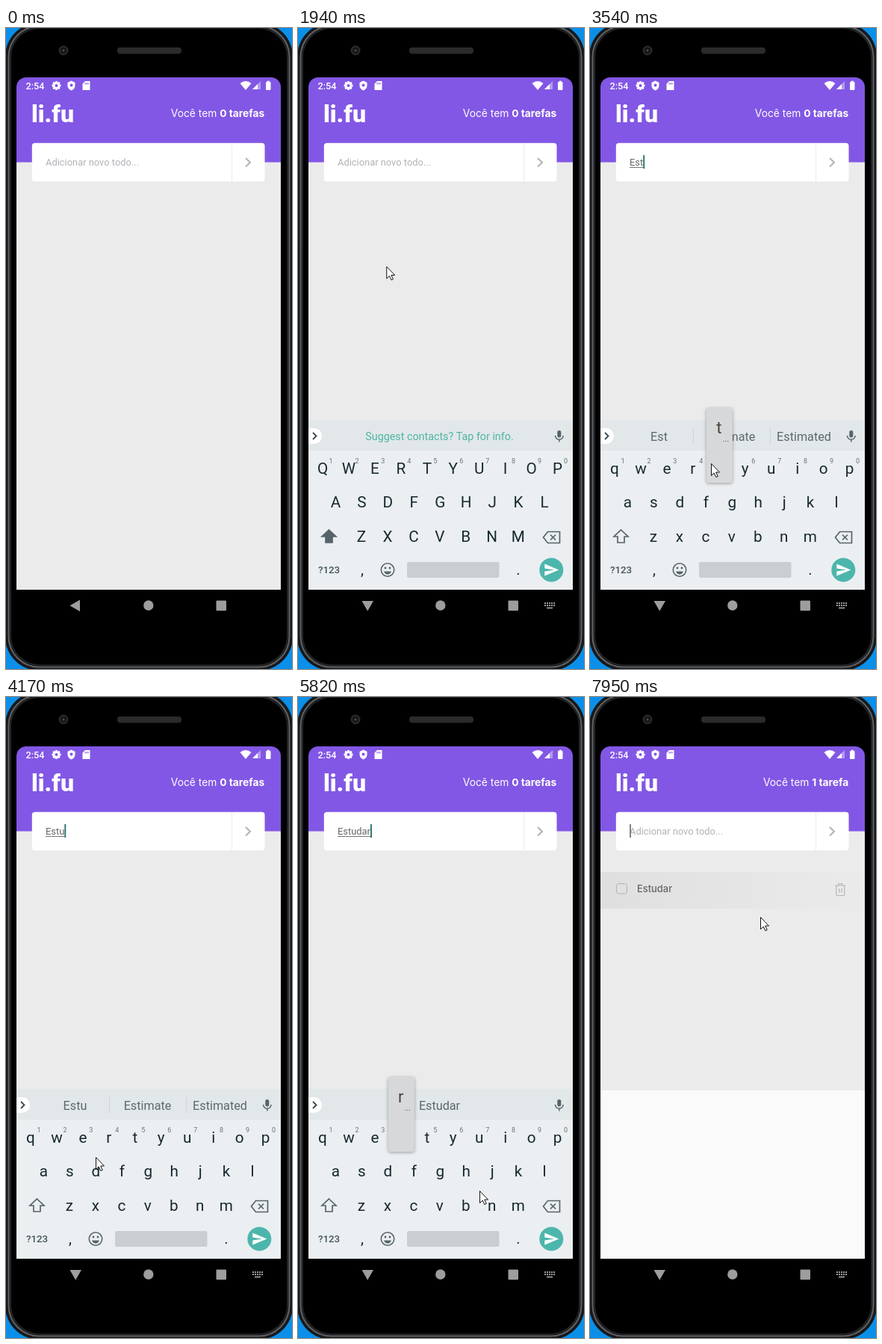
Recreate the animation shown at these times as an HTML page with a canvas. Size 383x857 px, loop 8000 ms.

```html
<!DOCTYPE html>
<html lang="pt-BR">
<head>
<meta charset="utf-8">
<title>Lista de tarefas</title>
<style>
html, body { margin: 0; width: 100%; height: 100%; overflow: hidden; background: #0b8fe9; }
canvas { display: block; width: 383px; height: 857px; }
</style>
</head>
<body>
<canvas id="stage" width="383" height="857"></canvas>
<script>
const canvas = document.getElementById('stage');
const stage = canvas.getContext('2d');
const layer = canvas.cloneNode().getContext('2d');
let ctx = stage;
const LOOP = 8000;
const ROBOTO = 'Roboto, sans-serif', INTER = 'Inter, sans-serif';

// pointer stops: time, x, y
const PATH = [
  [70, 367, 803], [850, 132, 183], [1000, 128, 176], [1730, 128, 176],
  [2260, 100, 584], [2450, 100, 584], [2640, 95, 622], [2850, 95, 622],
  [3330, 162, 582], [3650, 162, 582], [3800, 232, 584], [3930, 232, 584],
  [4170, 120, 615], [4450, 120, 615], [4800, 48, 622], [5080, 48, 622],
  [5500, 130, 582], [5720, 130, 582], [5820, 243, 660], [5890, 243, 660],
  [6080, 336, 722], [6300, 336, 722], [6580, 294, 535], [6650, 285, 418],
  [6720, 300, 350], [6790, 319, 310], [6990, 319, 310], [7480, 139, 170],
  [7740, 139, 170], [7950, 228, 294], [8000, 228, 294]
];

// key presses: letter, popup start, popup end
const PRESSES = [
  ['E', 2340, 2500], ['s', 2690, 2850], ['t', 3480, 3650], ['u', 3840, 4000],
  ['d', 4300, 4470], ['a', 4860, 5100], ['r', 5730, 5890]
];
const ROWS = [['qwertyuiop', 33, 588], ['asdfghjkl', 50.4, 633], ['zxcvbnm', 85, 679]];
const PITCH = 34.95;
const SENT = 6300, FOCUS = 1200, REFOCUS = 7810;
const CORNER = 13;

const clamp = v => Math.max(0, Math.min(1, v));
const ramp = (t, a, b) => clamp((t - a) / (b - a));
const smooth = v => v * v * (3 - 2 * v);

function text(s, x, y, size, color, font = ROBOTO, weight = 400, align = 'left') {
  ctx.font = `${weight} ${size}px ${font}`;
  ctx.textAlign = align;
  ctx.fillStyle = color;
  ctx.fillText(s, x, y);
  return ctx.measureText(s).width;
}

function rect(x, y, w, h, color, r = 0) {
  ctx.fillStyle = color;
  ctx.beginPath();
  ctx.roundRect(x, y, w, h, r);
  ctx.fill();
}

function frame(x, y, w, h, color, line, r = 0) {
  ctx.strokeStyle = color;
  ctx.lineWidth = line;
  ctx.beginPath();
  ctx.roundRect(x, y, w, h, r);
  ctx.stroke();
}

function disc(x, y, r, color) {
  ctx.fillStyle = color;
  ctx.beginPath();
  ctx.arc(x, y, r, 0, 7);
  ctx.fill();
}

function fillPath(d, color, x = 0, y = 0) {
  ctx.save();
  ctx.translate(x, y);
  ctx.fillStyle = color;
  ctx.fill(new Path2D(d), 'evenodd');
  ctx.restore();
}

function strokePath(d, color, line, x = 0, y = 0) {
  ctx.save();
  ctx.translate(x, y);
  ctx.strokeStyle = color;
  ctx.lineWidth = line;
  ctx.stroke(new Path2D(d));
  ctx.restore();
}

function phone() {
  rect(0, 0, 383, 857, '#0b8fe9');
  rect(-1, -7, 385, 866, '#17181a', 45);
  frame(3.5, -2.5, 376, 857, '#5f6266', 2, 41);
  frame(6, 0, 371, 852, '#222325', 2, 39);
  rect(7, 1, 369, 850, '#000', 38);
  disc(77, 30, 6.5, '#29292b');
  disc(77, 30, 4, '#151517');
  disc(77, 30, 1.6, '#4a4a4c');
  rect(149, 26, 86, 8.5, '#2b2b2b', 4);
}

function statusBar() {
  text('2:54', 26.5, 81.5, 12.7, '#fff', ROBOTO, 500);
  for (let i = 0; i < 4; i++) {
    ctx.save();
    ctx.translate(67.5, 77);
    ctx.rotate(i * Math.PI / 4);
    rect(-1.5, -6, 3, 12, '#fff', 0.5);
    ctx.restore();
  }
  disc(67.5, 77, 4.5, '#fff');
  disc(67.5, 77, 2, '#8257e5');
  fillPath('M0-6.5L5-4V0C5 3 3 5.5 0 6.5C-3 5.5-5 3-5 0V-4Z', '#fff', 87.5, 77);
  disc(87.5, 76.5, 2, '#8257e5');
  fillPath('M3.5-6H5V6H-5V-2.5L-1.5-6Z M-2-4V-1.5H-1V-4Z M0-4V-1.5H1V-4Z M2-4V-1.5H3V-4Z', '#fff', 107.5, 77);
  fillPath('M-7.5-3Q0-9 7.5-3L0 6Z', '#fff', 321, 77);
  fillPath('M341 71V82H330Z', 'rgba(255,255,255,.4)');
  fillPath('M337 75V82H330Z', '#fff');
  rect(348, 72, 6.5, 11, '#fff', 1);
  rect(349.8, 70.7, 3, 2, '#fff');
}

function header(t) {
  rect(14, 66, 354, 113.5, '#8257e5', [CORNER, CORNER, 0, 0]);
  statusBar();
  text('li.fu', 34, 125.5, 32, '#fff', ROBOTO, 900);
  const count = t < SENT ? '0 tarefas' : '1 tarefa';
  const w = text(count, 346.3, 119, 13.8, '#fff', INTER, 700, 'right');
  text('Você tem ', 346.3 - w, 119, 13.8, '#fff', INTER, 400, 'right');
}

function typedAt(t) {
  if (t >= SENT) return '';
  return PRESSES.filter(p => t >= p[1] + 50).map(p => p[0]).join('');
}

function caretOn(t) {
  if (t >= REFOCUS) return true;
  if (t < FOCUS || t >= SENT) return false;
  const since = PRESSES.reduce((last, p) => t >= p[1] + 50 ? p[1] + 50 : last, FOCUS);
  return (t - since) % 1000 < 500;
}

function input(t) {
  rect(34.8, 153.8, 311.7, 51.4, '#fff', 4);
  rect(302, 154, 1, 51, '#ebebeb');
  strokePath('M321 174L327 179.7L321 185.5', '#b2b2b2', 2);
  const typed = typedAt(t);
  let w = 0;
  if (typed) {
    w = text(typed, 53, 184.3, 12.9, '#666');
    rect(53, 186, w, 1, '#777');
  } else {
    text('Adicionar novo todo...', 53, 184.3, 12.9, '#b2b2b8');
  }
  if (caretOn(t)) rect(53 + w, 170, 2, 18, t >= REFOCUS ? '#7d8584' : typed ? '#317a70' : '#009688');
}

function task(t) {
  if (t < SENT) return;
  ctx.globalAlpha = ramp(t, SENT, SENT + 140);
  const g = ctx.createLinearGradient(14, 0, 368, 0);
  g.addColorStop(0, '#dfdfdf');
  g.addColorStop(1, '#ebebeb');
  rect(14, 234, 354, 49, g);
  frame(35.5, 249.5, 14, 13.5, '#b2b2b2', 1, 3);
  text('Estudar', 63, 261.3, 12.9, '#666', INTER, 500);
  ctx.globalAlpha = t < 6650 ? 0.25 : 1;
  strokePath('M-7-5.5H7M-2.5-5.5V-8H2.5V-5.5M-5.5-5.5V6.5Q-5.5 8 -4 8H4Q5.5 8 5.5 6.5V-5.5M-1.7-1.5V4M1.7-1.5V4',
    '#b2b2b2', 1.1, 335.3, 257.5);
  ctx.globalAlpha = 1;
}

function suggestions(typed) {
  const put = (s, x) => text(s, x, 552, 16.2, '#5c686d', ROBOTO, 400, 'center');
  if (typed.length < 3) {
    text('Suggest contacts? Tap for info.', 189.5, 551, 14.3, '#4db6a5', ROBOTO, 400, 'center');
  } else if (typed.length < 5) {
    [typed, 'Estimate', 'Estimated'].forEach((s, i) => put(s, [92.5, 189.5, 286.5][i]));
    rect(138, 535, 1, 21, '#cfd5d8');
    rect(241, 535, 1, 21, '#cfd5d8');
  } else {
    put(typed, 189.5);
  }
}

function keyPopup(press) {
  const letter = press[0];
  const row = ROWS.find(r => r[0].includes(letter.toLowerCase()));
  const x = row[1] + row[0].indexOf(letter.toLowerCase()) * PITCH, top = row[2] - 80;
  ctx.save();
  ctx.shadowColor = 'rgba(0,0,0,.35)';
  ctx.shadowBlur = 4;
  ctx.shadowOffsetY = 1;
  rect(x - 17, top, 35, 100, '#d6d8d9', 3);
  ctx.restore();
  text(letter, x, top + 34, 22, '#44443c', ROBOTO, 400, 'center');
  text('...', x + 9, top + 45, 11, '#555', ROBOTO, 400, 'center');
}

function keys(t) {
  const typed = t < SENT ? typedAt(t) : 'Estudar';
  const upper = !typed;
  const ink = '#17292f', grey = '#566469';
  rect(14, 524, 354, 41, '#e2e7e9');
  rect(14, 565, 354, 186, '#ebeff2');
  rect(14, 535, 18, 21, '#fff', [0, 10.5, 10.5, 0]);
  strokePath('M20 541L24.5 545.5L20 550', '#37474f', 1.8);
  rect(347.3, 538, 5, 9.5, grey, 2.5);
  strokePath('M344.5 545A5.3 5.3 0 0 0 355.1 545M349.8 550V553.5', grey, 1.5);
  suggestions(typed);

  ROWS.forEach(([letters, x0, y]) => [...letters].forEach((c, i) =>
    text(upper ? c.toUpperCase() : c, x0 + i * PITCH, y + 8, 20.7, ink, ROBOTO, 400, 'center')));
  for (let i = 0; i < 10; i++) {
    text((i + 1) % 10, 44 + i * PITCH, 581.5, 9, '#667378', ROBOTO, 400, 'center');
  }

  const shift = 'M0-9L9.5 0H4.5V8H-4.5V0H-9.5Z';
  if (upper) fillPath(shift, grey, 41.5, 680);
  strokePath(shift, grey, 1.7, 41.5, 680);
  strokePath('M-11 0L-5-7.5H11V7.5H-5ZM-1.5-3.5L5.5 3.5M5.5-3.5L-1.5 3.5', grey, 1.7, 339.5, 681);
  text('?123', 27, 729, 13.3, '#45545a', ROBOTO, 500);
  text(',', 86, 731, 20, ink, ROBOTO, 400, 'center');
  text('.', 295, 731, 20, ink, ROBOTO, 400, 'center');
  strokePath('M8.7 0A8.7 8.7 0 1 1-8.7 0A8.7 8.7 0 1 1 8.7 0', grey, 1.6, 120, 724.5);
  disc(117, 722, 1.4, grey);
  disc(123, 722, 1.4, grey);
  fillPath('M-5 2H5Q3.5 6 0 6T-5 2Z', grey, 120, 724.5);
  rect(146, 714, 123.5, 21, '#c9ced2', 2);
  disc(339.3, 724.5, 16, '#4db6ac');
  fillPath('M-9-8L10 0L-9 8V2L4 0L-9-2Z', '#fff', 339.3, 724.5);

  const press = PRESSES.find(p => t >= p[1] && t < p[2]);
  if (press) keyPopup(press);
}

// painted on its own layer, so that it fades as a whole
function keyboard(t) {
  const show = smooth(ramp(t, 1400, 1640));
  const hide = ramp(t, 6400, 6540);
  if (!show || t >= 6650) return;
  layer.clearRect(0, 0, 383, 857);
  ctx = layer;
  keys(t);
  ctx = stage;
  ctx.save();
  ctx.beginPath();
  ctx.roundRect(14, 66, 354, 726, CORNER);
  ctx.clip();
  ctx.globalAlpha = show * (1 - 0.69 * hide);
  ctx.drawImage(layer.canvas, 0, 41 * (1 - show + hide));
  ctx.restore();
}

function navBar(t) {
  const typing = (t >= 1250 && t < 6440) || t >= 7880;
  const c = '#9d9d9d';
  if (typing) fillPath('M85.5 766H101L93.2 779.5Z', c);
  else fillPath('M99 764.5V780L85.5 772.2Z', c);
  disc(190.8, 772, 6.7, c);
  rect(281.5, 765.5, 13.5, 13.5, c, 1);
  if (!typing) return;
  for (let r = 0; r < 2; r++)
    for (let i = 0; i < 5; i++) rect(330 + i * 3, 768 + r * 3, 2, 2, c);
  rect(333, 774.5, 8, 1.8, c);
}

function pointer(t) {
  if (t < PATH[0][0]) return;
  let i = 0;
  while (i < PATH.length - 2 && t >= PATH[i + 1][0]) i++;
  const [t0, x0, y0] = PATH[i], [t1, x1, y1] = PATH[i + 1];
  const k = smooth(ramp(t, t0, t1));
  const x = x0 + (x1 - x0) * k, y = y0 + (y1 - y0) * k;
  const arrow = 'M.5.5V16.5L4.2 13L6.8 18.5L9.2 17.4L6.7 12H11.5Z';
  fillPath(arrow, '#fff', x, y);
  strokePath(arrow, '#111', 1, x, y);
}

function draw(t) {
  phone();
  rect(14, 100, 354, 651, '#ebebeb');
  if (t >= 6650) rect(14, 526, 354, 225, '#fafafa');
  header(t);
  input(t);
  task(t);
  keyboard(t);
  navBar(t);
  pointer(t);
}

function tick() {
  draw(performance.now() % LOOP);
  requestAnimationFrame(tick);
}
tick();
</script>
</body>
</html>
```
